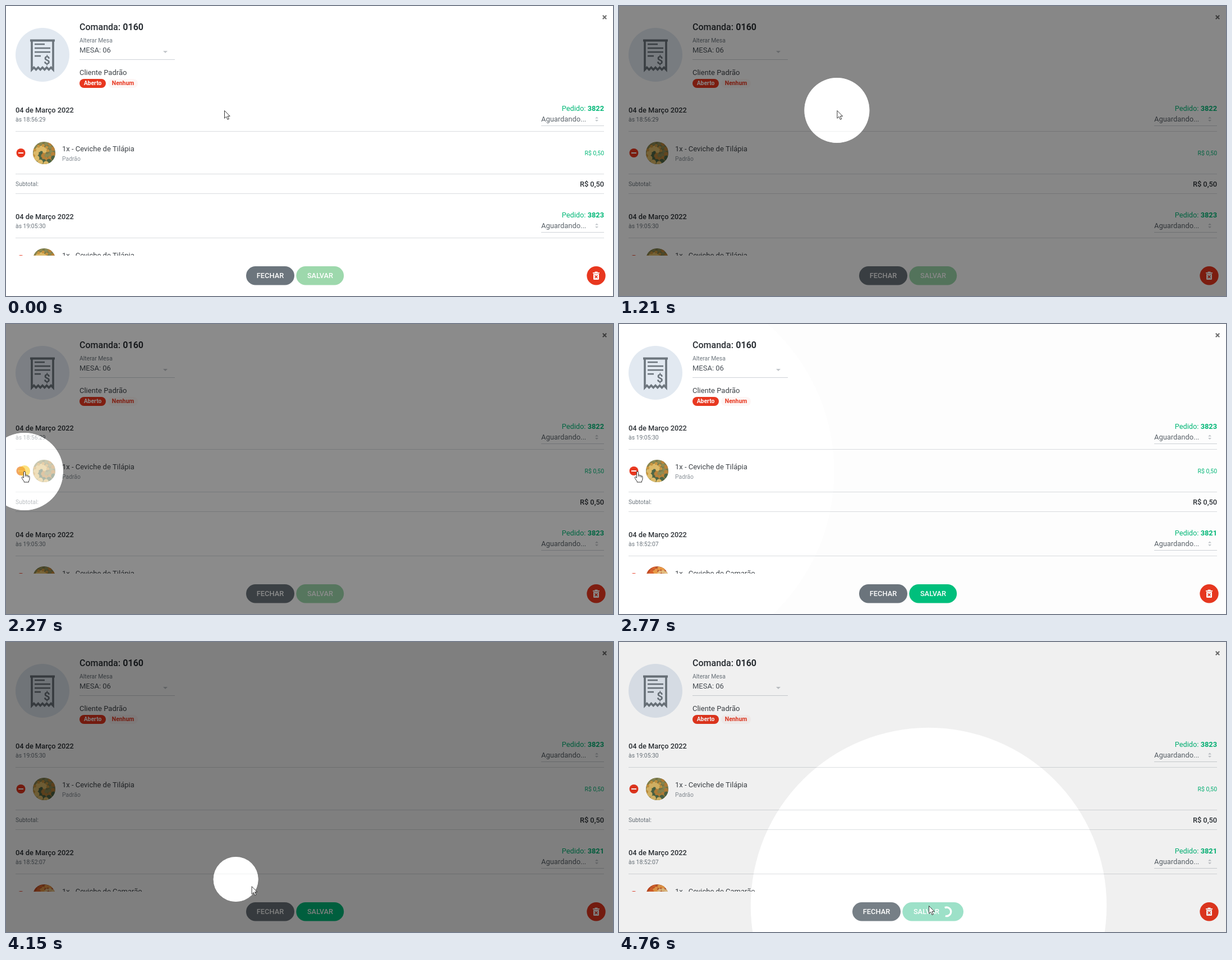
Write an HTML page with a canvas that moves like this. It is 1082x517 px and loops after 4.81 s.

```html
<!DOCTYPE html>
<html lang="pt-BR">
<head>
<meta charset="utf-8">
<title>Comanda</title>
<style>
html, body { margin: 0; width: 100%; height: 100%; overflow: hidden; background: #fff; }
canvas { display: block; width: 1082px; height: 517px; }
</style>
</head>
<body>
<canvas id="stage" width="1082" height="517"></canvas>
<script>
const W = 1082, H = 517, LOOP = 4810;
const ctx = document.getElementById('stage').getContext('2d');
const RED = '#e8371f', GREEN = '#00b877', GRAY = '#6c757d', DARK = '#2b3035', LINE = '#dadde0';

// Bursts of motion: start, end, number of steps
const BURSTS = [[920, 1420, 8], [1480, 1950, 8], [2010, 2080, 2], [2270, 2770, 8],
  [3460, 3920, 8], [4010, 4480, 8], [4540, 4760, 4]];
const REMOVED = 2450, SAVING = 4650;
const START = [389, 186], MINUS = [33, 263], SAVE = [552, 470];

const clamp = v => Math.max(0, Math.min(1, v));
const smooth = v => v * v * (3 - 2 * v);
const smoother = v => v * v * v * (v * (6 * v - 15) + 10);
const mix = (a, b, k) => a + (b - a) * k;

function snap(t) {
  let out = 0;
  for (const [a, b, n] of BURSTS) {
    if (t < a) break;
    const d = (b - a) / (n - 1);
    out = a + Math.min(n - 1, Math.floor((t - a + 1) / d)) * d;
  }
  return out;
}

function pointAt(t) {
  if (t < 3000) {
    const s = smooth(clamp((t - 1185) / 875));
    return [mix(START[0], MINUS[0], s), mix(START[1], MINUS[1], Math.pow(s, 1.5))];
  }
  const u = clamp((t - 3633) / 780);
  return [mix(MINUS[0], SAVE[0], smooth(u)), mix(MINUS[1], SAVE[1], smoother(u))];
}

// Spotlight strength, 0 (off) to 1 (tight and dark)
function focusAt(t) {
  if (t < 920) return 0;
  if (t < 2270) return Math.min(1, 0.2 + (t - 920) * 0.0026);
  if (t < 3460) return Math.max(0.015, 0.908 - 0.893 * (t - 2270) / 500);
  if (t < 4540) return Math.min(1, 0.2 + (t - 3460) * 0.0026);
  return 0.908 - 0.788 * (t - 4540) / 220;
}

function text(str, x, y, size, color, weight = 400, align = 'left') {
  ctx.font = `${weight} ${size}px Roboto, sans-serif`;
  ctx.textAlign = align;
  ctx.fillStyle = color;
  ctx.fillText(str, x, y);
}

function rect(x, y, w, h, color) {
  ctx.fillStyle = color;
  ctx.fillRect(x, y, w, h);
}

function disc(x, y, r, color) {
  ctx.fillStyle = color;
  ctx.beginPath();
  ctx.arc(x, y, r, 0, Math.PI * 2);
  ctx.fill();
}

function pill(x, y, w, h, color) {
  ctx.fillStyle = color;
  ctx.beginPath();
  ctx.roundRect(x, y, w, h, h / 2);
  ctx.fill();
}

function poly(points, color) {
  ctx.fillStyle = color;
  ctx.beginPath();
  points.forEach(([x, y]) => ctx.lineTo(x, y));
  ctx.closePath();
  ctx.fill();
}

function stroke(points, color, width) {
  ctx.strokeStyle = color;
  ctx.lineWidth = width;
  ctx.beginPath();
  points.forEach(([x, y]) => ctx.lineTo(x, y));
  ctx.stroke();
}

function receipt() {
  disc(65, 87, 48, '#e2e9f1');
  const edge = [[46, 62], [46, 113.5]];
  for (let i = 1; i <= 10; i++) edge.push([46 + i * 3.8, i % 2 ? 109.5 : 113.5]);
  edge.push([84, 62]);
  stroke(edge, GRAY, 3.6);
  rect(43, 59.5, 44, 4, GRAY);
  [[68, 18], [75, 28], [82, 28], [89, 11]].forEach(([y, w]) => rect(51, y - 1.2, w, 2.6, GRAY));
  text('$', 73, 104, 20, GRAY, 700, 'center');
}

function header() {
  receipt();
  text('Comanda: ', 131, 43, 16, DARK, 500);
  text('0160', 245, 43, 16, DARK, 700, 'right');
  text('Alterar Mesa', 131, 65, 10.4, GRAY);
  text('MESA: 06', 131, 83, 13, '#495057');
  rect(131, 95, 170, 1, '#cfd3d7');
  poly([[280, 80], [288, 80], [284, 84]], '#c3c7cb');
  text('Cliente Padrão', 131, 123, 13, '#3d4247');
  pill(131, 130, 47, 16, RED);
  text('Aberto', 154.5, 141, 10.4, '#fff', 700, 'center');
  pill(182, 130, 53, 16, '#fdf6f5');
  text('Nenhum', 208.5, 141, 10.4, RED, 700, 'center');
  stroke([[1063.8, 16.8], [1070.2, 23.2]], '#707070', 2);
  stroke([[1070.2, 16.8], [1063.8, 23.2]], '#707070', 2);
}

// Simple plate of food: overlapping soft blobs
function dish(x, y, shrimp) {
  ctx.save();
  ctx.beginPath();
  ctx.arc(x, y, 20, 0, Math.PI * 2);
  ctx.clip();
  rect(x - 20, y - 20, 40, 40, shrimp ? '#b9552a' : '#79784a');
  const tones = shrimp ? ['#d9622c', '#e89a47', '#e3bd80', '#c8481f']
    : ['#c9953f', '#dcb968', '#4d6545', '#b98238', '#8d8a52'];
  for (let i = 0; i < 34; i++) {
    const a = i * 2.4, r = 3.5 * Math.sqrt(i);
    disc(x + Math.cos(a) * r, y + Math.sin(a) * r, 2.6 + (i * 7 % 5) * 0.6, tones[i * 3 % tones.length]);
  }
  ctx.restore();
}

function order(y, time, id, item) {
  ctx.save();
  ctx.translate(0, y);
  text('04 de Março 2022', 17, 190, 12.8, DARK, 500);
  text('às ' + time, 17, 206, 10.4, GRAY);
  text('Pedido: ', 1036.6, 187, 12.8, GREEN, 400, 'right');
  text(id, 1066, 187, 12.8, GREEN, 700, 'right');
  text('Aguardando...', 954, 206, 12.9, '#5c646b');
  poly([[1050, 200.5], [1056, 200.5], [1053, 197.5]], '#c3c7cb');
  poly([[1050, 203], [1056, 203], [1053, 206]], '#c3c7cb');
  rect(954, 213, 112, 1, '#cfd3d7');
  rect(17, 223, 1049, 1, LINE);
  disc(26.5, 262, 8, RED);
  rect(22, 261, 9, 2, '#fff');
  dish(68, 262, item === 'Camarão');
  text('1x - Ceviche de ' + item, 100, 259, 13, '#3d4247');
  text('Padrão', 100, 276, 10.4, '#8b9299');
  text('R$ 0,50', 1066, 266, 10.4, GREEN, 400, 'right');
  rect(17, 299, 1049, 1, LINE);
  text('Subtotal:', 17, 321, 10.4, GRAY);
  text('R$ 0,50', 1066, 322, 12.8, DARK, 500, 'right');
  rect(17, 334, 1049, 1, LINE);
  ctx.restore();
}

function orders(removed) {
  ctx.save();
  ctx.beginPath();
  ctx.rect(0, 150, W, 295);
  ctx.clip();
  if (removed) {
    order(0, '19:05:30', '3823', 'Tilápia');
    order(190, '18:52:07', '3821', 'Camarão');
  } else {
    order(0, '18:56:29', '3822', 'Tilápia');
    order(190, '19:05:30', '3823', 'Tilápia');
  }
  ctx.restore();
}

function footer(t, hover) {
  const saving = t >= SAVING, shift = saving ? -12 : 0;
  pill(428 + shift, 464, 86, 33.5, GRAY);
  text('FECHAR', 471 + shift, 485, 12.8, '#fff', 500, 'center');
  const color = saving ? '#96dfc4' : t < REMOVED ? '#9dd8ac' : hover ? '#00a96f' : '#00c07d';
  pill(517.3 + shift, 464, saving ? 108.7 : 84.9, 33.5, color);
  text('SALVAR', 560 + shift, 485, 12.8, '#fff', 500, 'center');
  if (saving) {
    const turn = (t - 4760) / 750 * Math.PI * 2;
    ctx.strokeStyle = '#fff';
    ctx.lineWidth = 3.4;
    ctx.beginPath();
    ctx.arc(584, 480.8, 7.8, turn - 2, turn + 1.85);
    ctx.stroke();
  }
  disc(1052, 480.8, 16.7, RED);
  rect(1046, 475, 12, 1.8, '#fff');
  rect(1049.5, 473.6, 5, 1.6, '#fff');
  ctx.fillStyle = '#fff';
  ctx.beginPath();
  ctx.roundRect(1047, 477.6, 10, 10.4, [0, 0, 1.5, 1.5]);
  ctx.fill();
  stroke([[1049.6, 480.4], [1054.4, 485.2]], RED, 1.5);
  stroke([[1054.4, 480.4], [1049.6, 485.2]], RED, 1.5);
}

function spotlight([x, y], p) {
  if (!p) return;
  const r = 355 - 315 * p;
  ctx.fillStyle = `rgba(0,0,0,${0.5 * p})`;
  ctx.beginPath();
  ctx.rect(0, 0, W, H);
  ctx.arc(x, y, r, 0, Math.PI * 2);
  ctx.fill('evenodd');
  disc(x, y, r, `rgba(255,255,255,${0.6 * p})`);
}

const ARROW = new Path2D('M.5 .5V14.2L3.7 11.2L6 16.4L8.3 15.4L6 10.4H10.2Z');
const HAND = new Path2D('M-1.6 1.5Q-1.6 0 0 0T1.6 1.5V6.5Q3.3 5.5 4.3 7Q6 6.3 6.8 7.9Q9 7.5 9 9.6' +
  'V13Q9 15.5 7.5 17V19H-.8V17.3Q-2.6 15.5-4.6 11.8Q-5.4 10-4 9.5Q-2.8 9.4-1.6 11.4Z');

function cursor([x, y], hand) {
  ctx.save();
  ctx.translate(x, y);
  const shape = hand ? HAND : ARROW;
  ctx.fillStyle = '#fff';
  ctx.fill(shape);
  ctx.strokeStyle = '#222';
  ctx.lineWidth = 0.9;
  ctx.lineJoin = 'round';
  ctx.stroke(shape);
  if (hand) {
    for (const [fx, fy] of [[1.6, 6.5], [4.3, 7], [6.8, 8]]) stroke([[fx, fy], [fx, fy + 2.8]], '#222', 0.8);
  }
  ctx.restore();
}

function draw(time) {
  const t = snap(time);
  const focus = pointAt(t);
  const tip = t > 3000 ? pointAt(t + 32) : focus;
  const onSave = tip[0] > 517 && tip[1] > 464 && t < SAVING;
  rect(0, 0, W, H, '#fff');
  header();
  orders(t >= REMOVED);
  footer(t, onSave);
  spotlight(focus, focusAt(t));
  if (t >= 2270 && t < 2340) {
    disc(33, 262, 10, 'rgba(250,205,40,.6)');
    disc(26.5, 262, 8, 'rgba(240,170,50,.55)');
  }
  cursor(tip, tip[0] < 42 || onSave);
}

const origin = performance.now();
function tick() {
  draw((performance.now() - origin) % LOOP);
  requestAnimationFrame(tick);
}
tick();
</script>
</body>
</html>
```
